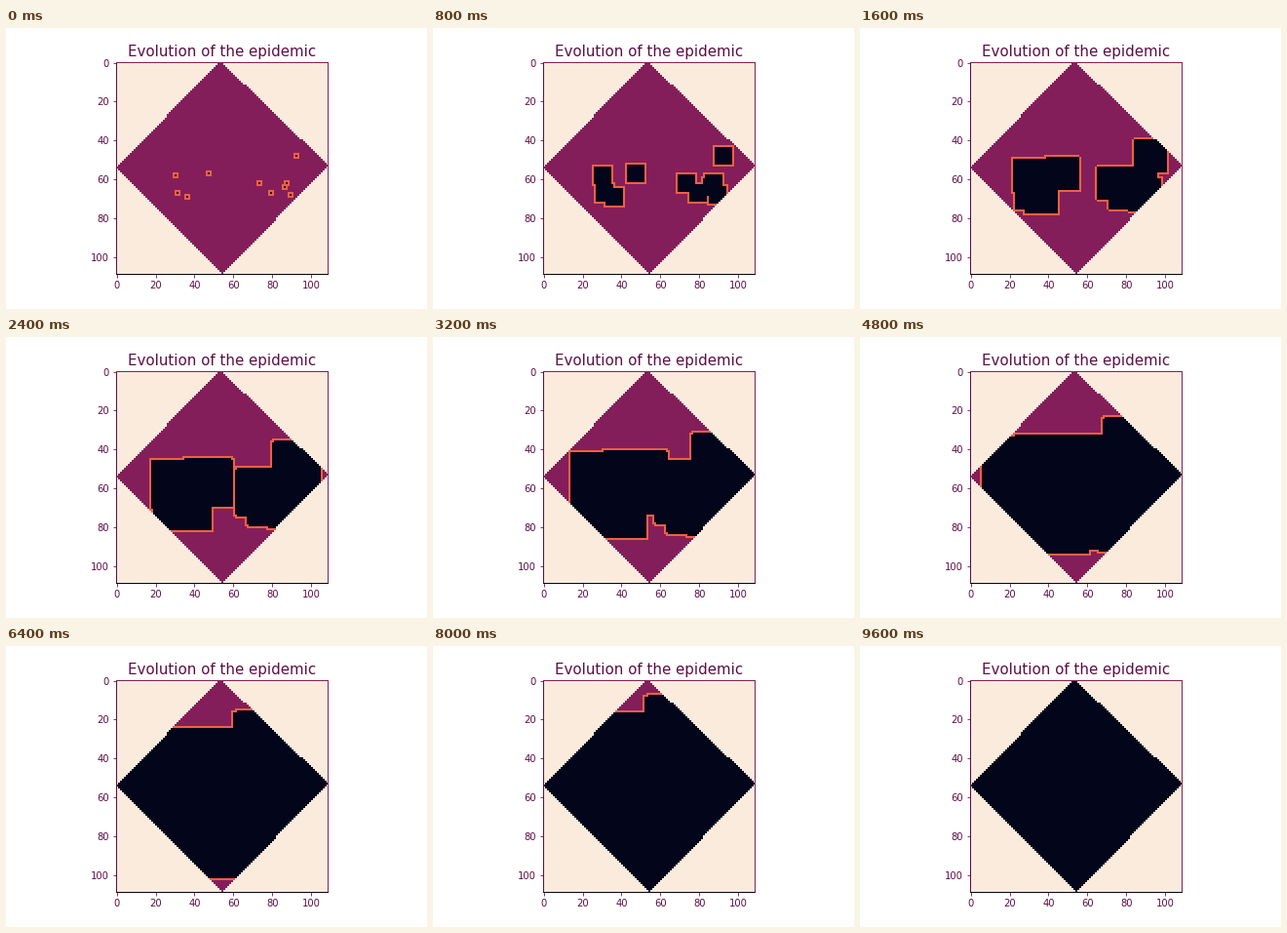
Animation, 432 px wide and 288 px high, one loop 9.8 s. Source, as a matplotlib script:

```python
import numpy as np
import matplotlib.pyplot as plt
from matplotlib.animation import FuncAnimation
from matplotlib.colors import ListedColormap

SIZE = 109
STEPS = 49
CENTER = SIZE // 2
DEAD, HEALTHY, INFECTED, OUTSIDE = range(4)
COLORS = ["#03051a", "#841e5a", "#f06043", "#faebdd"]
INK = "#5c0d43"

SEEDS = [(30, 58), (31, 67), (36, 69), (47, 57), (73, 62),
         (79, 67), (87, 62), (86, 64), (89, 68), (92, 48)]

yy, xx = np.mgrid[:SIZE, :SIZE]


def diamond():
    """Cells between the four straight borders of the territory."""
    y = np.arange(SIZE)
    left = np.round(np.interp(y, [0, 54, 108], [53, 0, 54]))
    right = np.round(np.interp(y, [0, 53, 108], [53.1, 108, 54]))
    return (xx >= left[:, None]) & (xx <= right[:, None])


def arrival(x, y):
    """Day on which the infection from one seed reaches each cell.

    It spreads as a growing square; corners facing the middle of the map,
    apart from the south-east ones, lag by a day and wear down with time.
    """
    dx, dy = xx - x, yy - y
    day = np.maximum(abs(dx), abs(dy))
    inward = dx * (CENTER - x) > 0
    corner = inward & (dy != 0) & ((dx < 0) | (dy < 0))
    gap = abs(dy) - abs(dx)
    late = (gap == 0) & (day >= 9) | (gap == 1) & (day >= 27)
    return day + (corner & late)


inside = diamond()
day_reached = np.min([arrival(*seed) for seed in SEEDS], axis=0)


def state(day):
    grid = np.where(day_reached < day, DEAD, HEALTHY)
    grid[day_reached == day] = INFECTED
    grid[~inside] = OUTSIDE
    return grid


fig, ax = plt.subplots(figsize=(6, 4), dpi=72, facecolor="white")
fig.subplots_adjust(left=0.125, right=0.9, bottom=0.125, top=0.88)
image = ax.imshow(state(1), cmap=ListedColormap(COLORS), vmin=0, vmax=3,
                  interpolation="nearest")
ax.set_title("Evolution of the epidemic", fontsize=15, color=INK)
ax.set_xticks(range(0, SIZE, 20))
ax.set_yticks(range(0, SIZE, 20))
ax.tick_params(labelsize=10, color=INK, labelcolor=INK)

ax.spines[:].set_linewidth(1)
ax.spines["left"].set_color(INK)
ax.spines["bottom"].set_color(COLORS[DEAD])
ax.spines[["top", "right"]].set_color(COLORS[HEALTHY])


def update(i):
    image.set_data(state(i + 1))
    return [image]


anim = FuncAnimation(fig, update, frames=STEPS, interval=200, repeat=True,
                     repeat_delay=0, blit=False)
plt.show()
```
